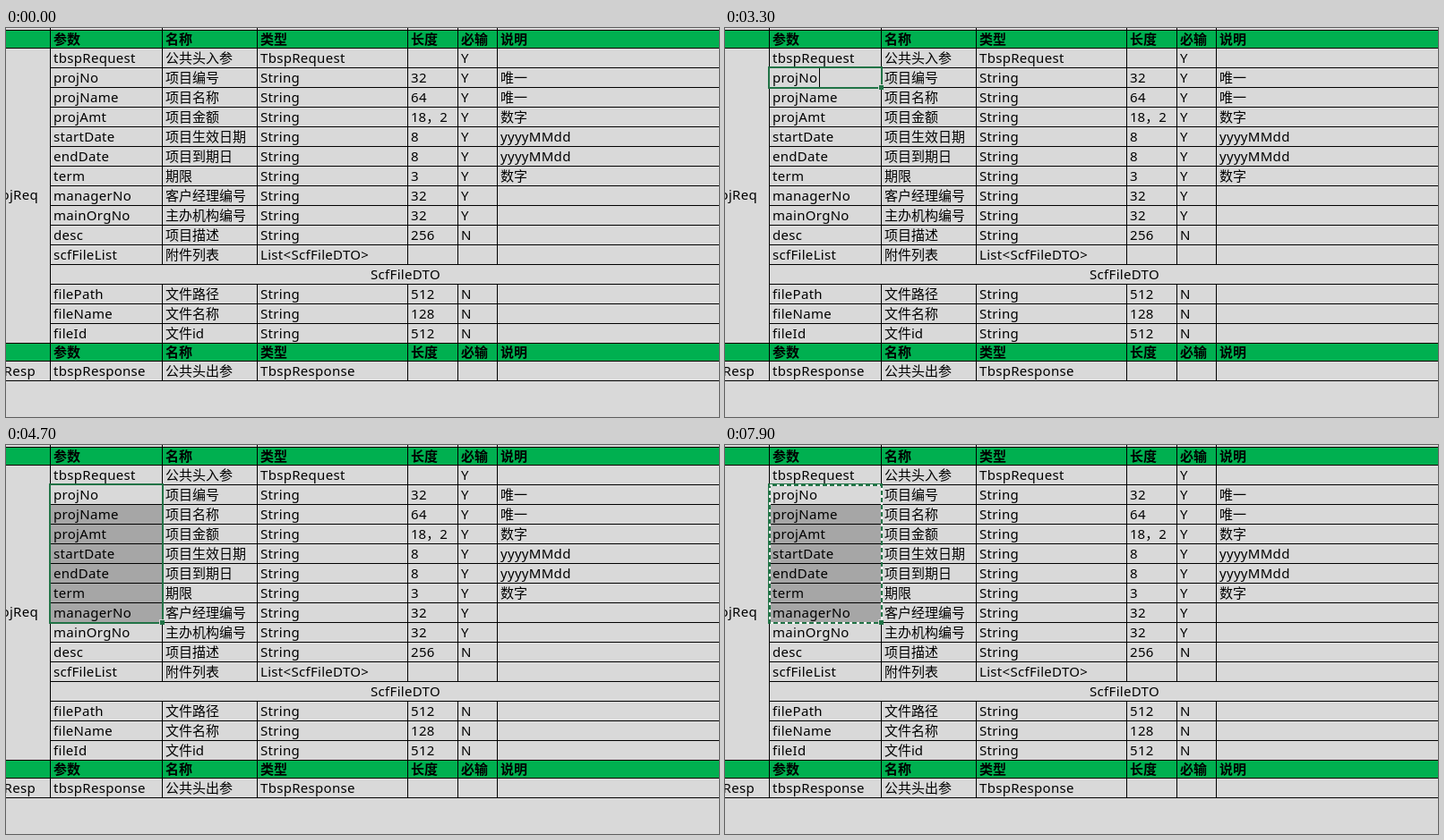
Recreate the animation shown at these times as an HTML page with a canvas. Size 796 by 435 pixels, loop 8000 ms.

```html
<!DOCTYPE html>
<html lang="zh-CN">
<head>
<meta charset="utf-8">
<style>
html, body { margin: 0; width: 100%; height: 100%; overflow: hidden; background: #d9d9d9; }
canvas { display: block; }
</style>
</head>
<body>
<canvas id="stage" width="796" height="435"></canvas>
<script>
const ctx = document.getElementById('stage').getContext('2d');
const W = 796, H = 435, LOOP = 8000;
const TOP = 22, ROW = 22;
const GREY = '#d9d9d9', GREEN = '#00b050', FRAME = '#217346', FILL = '#a6a6a6';
const FONT = '15px "Noto Sans", "Noto Sans CJK SC", "Noto Sans CJK", sans-serif';
const cols = [49, 174, 280, 448, 504, 548];
const heads = ['参数', '名称', '类型', '长度', '必输', '说明'];
const rows = [
  ['tbspRequest', '公共头入参', 'TbspRequest', '', 'Y', ''],
  ['projNo', '项目编号', 'String', '32', 'Y', '唯一'],
  ['projName', '项目名称', 'String', '64', 'Y', '唯一'],
  ['projAmt', '项目金额', 'String', '18，2', 'Y', '数字'],
  ['startDate', '项目生效日期', 'String', '8', 'Y', 'yyyyMMdd'],
  ['endDate', '项目到期日', 'String', '8', 'Y', 'yyyyMMdd'],
  ['term', '期限', 'String', '3', 'Y', '数字'],
  ['managerNo', '客户经理编号', 'String', '32', 'Y', ''],
  ['mainOrgNo', '主办机构编号', 'String', '32', 'Y', ''],
  ['desc', '项目描述', 'String', '256', 'N', ''],
  ['scfFileList', '附件列表', 'List<ScfFileDTO>', '', '', ''],
  null, // merged row
  ['filePath', '文件路径', 'String', '512', 'N', ''],
  ['fileName', '文件名称', 'String', '128', 'N', ''],
  ['fileId', '文件id', 'String', '512', 'N', '']
];
const response = ['tbspResponse', '公共头出参', 'TbspResponse', '', '', ''];
const HEAD2 = TOP + ROW * rows.length, RESP = HEAD2 + 20, END = RESP + ROW;
const lineY = row => TOP + ROW * row;

function rect(color, x, y, w, h) {
  ctx.fillStyle = color;
  ctx.fillRect(x, y, w, h);
}

function text(str, x, y, align = 'left', weight = '') {
  ctx.font = weight + ' ' + FONT;
  ctx.letterSpacing = /[^\x00-\x7f]/.test(str) ? '0px' : '0.3px';
  ctx.textAlign = align;
  ctx.fillStyle = '#000';
  ctx.fillText(str, x, y);
}

function cells(list, y, weight) {
  list.forEach((str, i) => text(str, cols[i] + 4, y, 'left', weight));
}

function hline(y, x = 0) { rect('#000', x, y, W - x, 1); }

function drawGrid() {
  rect(GREEN, 0, 2, W, 20);
  rect(GREEN, 0, HEAD2, W, 20);
  for (const y of [2, TOP, HEAD2, RESP, END]) hline(y);
  for (let i = 1; i < rows.length; i++) hline(lineY(i), cols[0]);
  const merged = lineY(rows.indexOf(null));
  cols.forEach((x, i) => {
    if (!i) return rect('#000', x, 0, 1, END);
    rect('#000', x, 0, 1, merged);
    rect('#000', x, merged + ROW, 1, END - merged - ROW);
  });
}

function drawText() {
  cells(heads, 18, 'bold');
  cells(heads, HEAD2 + 16, 'bold');
  rows.forEach((row, i) => {
    const y = lineY(i) + 17;
    if (row) cells(row, y);
    else text('ScfFileDTO', 446, y, 'center');
  });
  cells(response, RESP + 17);
  text('projReq', 36, 192, 'right');
  text('projResp', 33, RESP + 17, 'right');
}

// First and last selected row at time t
function selection(t) {
  if (t < 1100) return null;
  if (t < 2300) return [1, 8];
  if (t < 3600) return [1, 1];
  if (t < 3700) return [2, 2];
  if (t < 4100) return [3, 3];
  return [1, Math.min(7, 1 + Math.floor((t - 4100) / 100))];
}

function drawFill([first, last]) {
  for (let r = first + 1; r <= last; r++) {
    rect(FILL, cols[0] + 1, lineY(r) + 1, cols[1] - cols[0] - 1, ROW - 1);
  }
}

function drawAnts(y0, y1, t) {
  ctx.lineWidth = 2;
  ctx.strokeStyle = FRAME;
  ctx.strokeRect(50, y0 + 1, 125, y1 - y0);
  ctx.strokeStyle = '#fff';
  ctx.setLineDash([3, 5]);
  ctx.lineDashOffset = -2 * Math.floor((t - 6300) / 100);
  ctx.strokeRect(50, y0 + 1, 125, y1 - y0);
  ctx.setLineDash([]);
}

function drawFrame([first, last], t) {
  const y0 = lineY(first), y1 = lineY(last + 1);
  ctx.lineWidth = 2;
  ctx.strokeStyle = FRAME;
  ctx.strokeRect(49, y0, 126, y1 - y0 + 1);
  if (t >= 6300) drawAnts(y0, y1, t);
  rect(GREY, 171, y1 - 3, 6, 6);
  rect(FRAME, 172, y1 - 2, 5, 5);
}

function drawTag(y, alpha) {
  ctx.save();
  ctx.globalAlpha = alpha;
  ctx.translate(178, y);
  rect('#fff', 0, 0, 24, 24);
  ctx.lineWidth = 1;
  ctx.strokeStyle = '#8c8c8c';
  ctx.strokeRect(0.5, 0.5, 23, 23);
  ctx.strokeStyle = '#666';
  ctx.strokeRect(8.5, 6.5, 10, 12);
  for (const ly of [9, 12, 15]) rect('#666', 11, ly, 6, 1);
  ctx.fillStyle = '#ed9b4a';
  ctx.beginPath();
  [[8, 4], [12, 4], [9, 9], [12, 9], [5, 16], [7, 11], [4, 11]].forEach(p => ctx.lineTo(...p));
  ctx.fill();
  ctx.restore();
}

function tagAlpha(t) {
  if (t >= 1100 && t < 2300 || t >= 5700 && t < 6300) return 0.5;
  return t >= 6300 && t < 7200 ? 1 : 0;
}

function caretOn(t) {
  return t >= 2700 && t < 2800 || t >= 3300 && t < 3600;
}

function draw(t) {
  const sel = selection(t), alpha = tagAlpha(t);
  rect(GREY, 0, 0, W, H);
  drawGrid();
  if (sel) drawFill(sel);
  drawText();
  if (sel) drawFrame(sel, t);
  if (caretOn(t)) rect('#000', 105, 45, 1, 21);
  if (alpha) drawTag(lineY(sel[1] + 1) + 4, alpha);
}

const start = performance.now();
function tick() {
  draw((performance.now() - start) % LOOP);
  requestAnimationFrame(tick);
}
tick();
</script>
</body>
</html>
```
